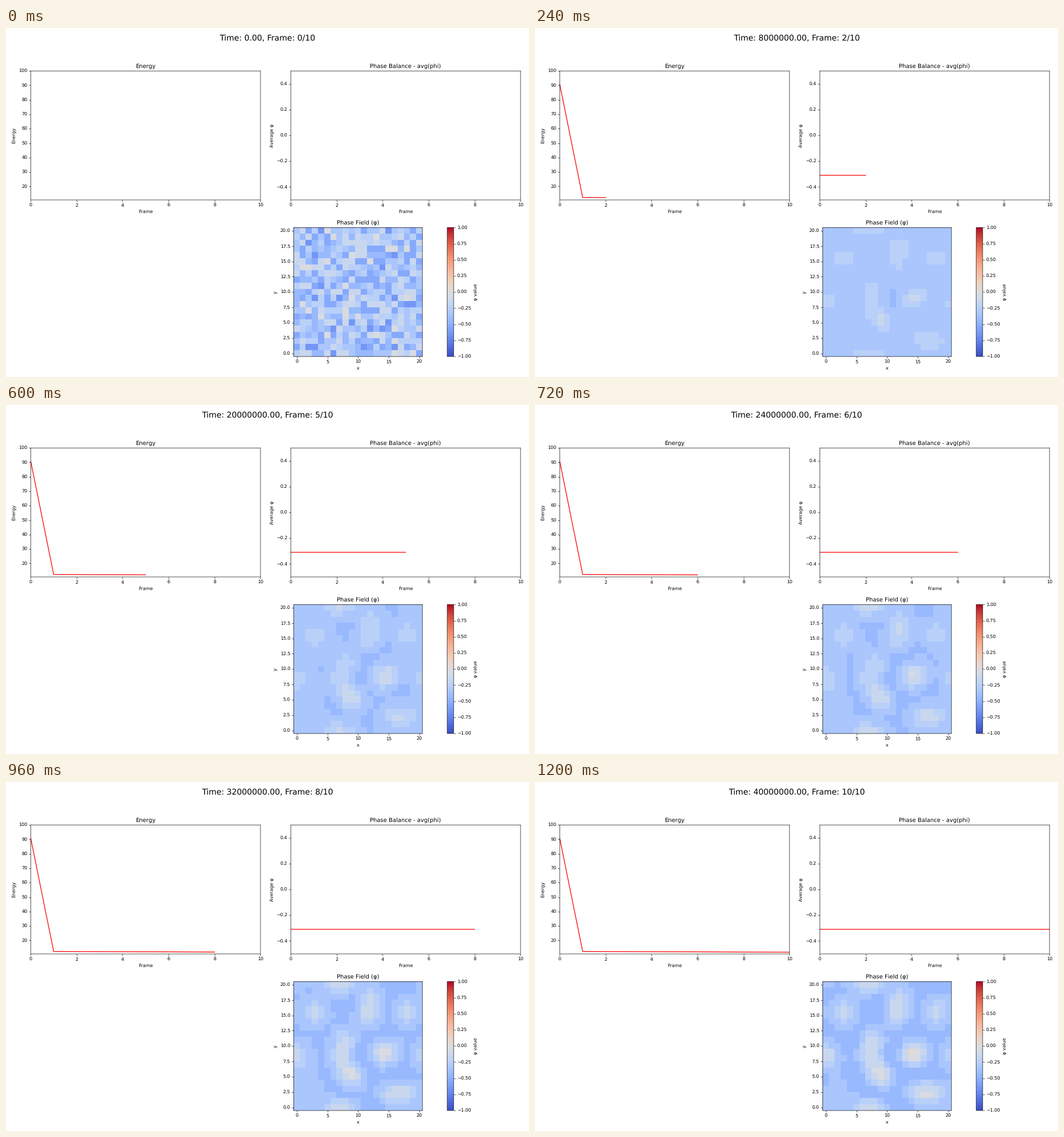
Recreate the animation shown at these times as a matplotlib script. Size 917 by 611 pixels, loop 1.32 s.

```python
import numpy as np
import matplotlib.pyplot as plt
from matplotlib.animation import FuncAnimation
from matplotlib.cm import ScalarMappable
from matplotlib.colors import Normalize

W, H, DPI = 917, 611, 61.1
N = 21
STEPS = 10
STEP_TIME = 4e6
BASE, LEVEL = -.335, .1

# Soft, unsnapped strokes and glyphs
plt.rcParams.update({
    "font.family": "DejaVu Sans",
    "text.hinting": "none",
    "text.hinting_factor": 1,
    "path.snap": False,
})

# Seeds of the growing phase; close pairs merge into larger drops
SEEDS = [
    (3, 15.5), (18, 15.6), (0.2, 8.4),
    (11.6, 15), (12, 17.7),
    (15.4, 2.4), (17.8, 2.2),
    (13.8, 8.4), (14.9, 9.3),
    (8.3, 5.9), (9.5, 4.9),
    (7.2, 8.2), (7.8, 10.8),
    (5.8, 20.5), (8.2, 20.5),
]

gy, gx = np.mgrid[0:N, 0:N]


def wrap(d):
    """Shortest signed distance on the periodic grid."""
    return (d + N / 2) % N - N / 2


def drop(x, y):
    """A bright core that drains a wider ring around it."""
    r2 = wrap(gx - x) ** 2 + wrap(gy - y) ** 2
    return .37 * np.exp(-r2 / (2 * 1.4 ** 2)) - .12 * np.exp(-r2 / (2 * 2.2 ** 2))


PATTERN = sum(drop(x, y) for x, y in SEEDS) - .02


def field(i):
    if i == 0:
        phi = np.random.default_rng(7).uniform(-.61, -.05, (N, N))
    else:
        t = (i - 1) / (STEPS - 1)
        phi = BASE + (.45 + .55 * t ** 1.3) * PATTERN
    return BASE + LEVEL * np.round((phi - BASE) / LEVEL)


fig = plt.figure(figsize=((W + .01) / DPI, (H + .01) / DPI), dpi=DPI,
                 facecolor="white")


def panel(x, y, w, h, title="", xlabel="", ylabel=""):
    ax = fig.add_axes([x / W, 1 - (y + h) / H, w / W, h / H])
    ax.set(title=title, xlabel=xlabel, ylabel=ylabel)
    return ax


def graph(x, title, ylabel, ylim, yticks):
    ax = panel(x, 75.2, 402.8, 225.8, title, "Frame", ylabel)
    ax.set(xlim=(0, STEPS), ylim=ylim, xticks=range(0, 11, 2), yticks=yticks)
    line, = ax.plot([], [], color="red", lw=1.5)
    return line


energy_line = graph(43.3, "Energy", "Energy", (10.7, 100), range(20, 101, 10))
mean_line = graph(499.3, "Phase Balance - avg(phi)", "Average φ",
                  (-.5, .5), [-.4, -.2, 0, .2, .4])

norm = Normalize(-1, 1)
field_ax = panel(504.4, 349.4, 225.7, 225.7, "Phase Field (φ)", "x", "y")
image = field_ax.imshow(field(0), cmap="coolwarm", norm=norm, origin="lower",
                        interpolation="nearest", aspect="auto")
field_ax.set(xticks=range(0, 21, 5), yticks=np.arange(0, 20.1, 2.5))

bar_ax = panel(773.6, 349.4, 11.3, 225.7)
fig.colorbar(ScalarMappable(norm, "coolwarm"), cax=bar_ax,
             label="φ value", ticks=np.linspace(-1, 1, 9))

steps = np.arange(STEPS + 1)
energy = np.where(steps == 0, 90.9, 12.4 - .055 * (steps - 1))
mean = np.full(STEPS + 1, -.309)
heading = fig.suptitle("", fontsize=16)


def update(i):
    energy_line.set_data(steps[:i + 1], energy[:i + 1])
    mean_line.set_data(steps[:i + 1], mean[:i + 1])
    image.set_data(field(i))
    heading.set_text(f"Time: {i * STEP_TIME:.2f}, Frame: {i}/{STEPS}")
    return energy_line, mean_line, image, heading


def reset():
    return update(0)


anim = FuncAnimation(fig, update, frames=STEPS + 1, init_func=reset,
                     interval=120, repeat=True)
plt.show()
```
